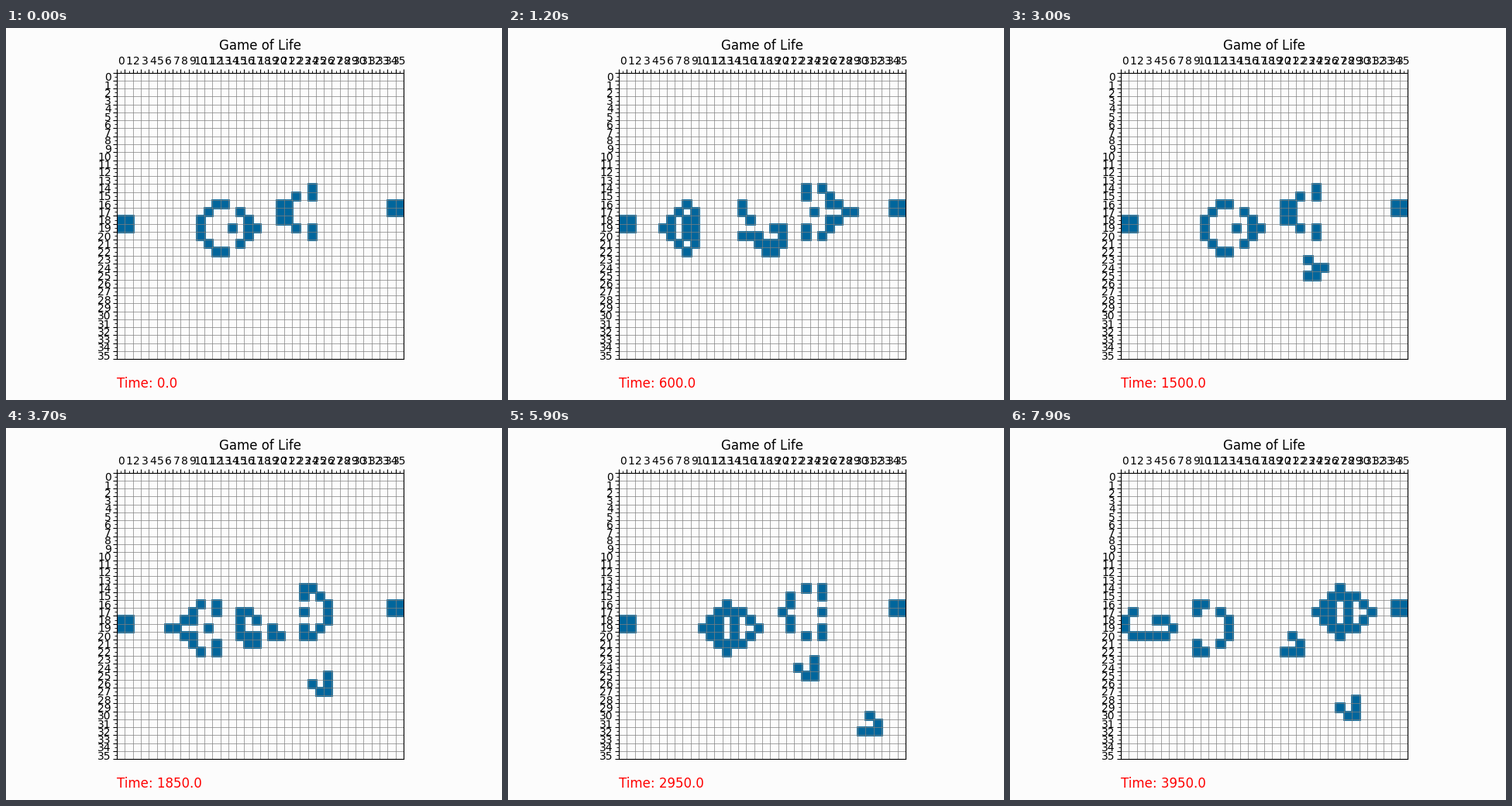
These frames come from a looping animation (640 by 480 pixels, 8 s). A matplotlib script:

```python
import numpy as np
import matplotlib.pyplot as plt
from matplotlib.animation import FuncAnimation
from matplotlib.patches import Rectangle

N = 36
MARGIN = 8  # hidden cells around the view, so gliders can leave
FRAMES = 80
STEP = 50.0
BG = "#fcfcfc"
CELL = "#00669c"


def glider_gun():
    """Two blocks with two shuttles between them, each mirrored on its own row."""
    board = np.zeros((N + 2 * MARGIN,) * 2, int)
    view = board[MARGIN:-MARGIN, MARGIN:-MARGIN]
    view[18:20, 0:2] = 1
    view[16:18, 34:36] = 1
    view[16:19, 20:22] = 1
    view[19, [14, 17]] = 1
    for side in (-1, 1):
        for d in range(4):
            view[19 + side * d, 10 + max(0, d - 1)] = 1
        for d, col in enumerate((16, 16, 15, 13)):
            view[19 + side * d, col] = 1
        view[17 + side * 2, [22, 24]] = 1
        view[17 + side * 3, 24] = 1
    return board


def evolve(board):
    p = np.pad(board, 1)
    n = len(board)
    count = sum(p[r:r + n, c:c + n]
                for r in range(3) for c in range(3)) - board
    return ((count == 3) | ((board == 1) & (count == 2))).astype(int)


boards = [glider_gun()]
while len(boards) < FRAMES:
    boards.append(evolve(boards[-1]))

fig, ax = plt.subplots(figsize=(6.4, 4.8), dpi=100, facecolor=BG)
ax.set_facecolor(BG)
ax.set_aspect("equal")
ax.set_xlim(-0.5, N - 0.5)
ax.set_ylim(N - 0.5, -0.5)
ax.xaxis.tick_top()

# Major ticks carry the grid, minor ticks the labels
for axis in (ax.xaxis, ax.yaxis):
    axis.set_ticks(np.arange(-0.5, N), labels=[""] * (N + 1))
    axis.set_ticks(np.arange(N), labels=range(N), minor=True)
ax.grid(which="major", color="gray", linewidth=0.5)
ax.set_title("Game of Life")
clock = ax.text(0, -0.1, "", color="red", fontsize=12, transform=ax.transAxes)
cells = []


def update(n):
    while cells:
        cells.pop().remove()
    for r, c in np.argwhere(boards[n][MARGIN:-MARGIN, MARGIN:-MARGIN]):
        cells.append(ax.add_patch(
            Rectangle((c - 0.5, r - 0.5), 1, 1, color=CELL, linewidth=2)))
    clock.set_text(f"Time: {n * STEP}")
    return cells + [clock]


anim = FuncAnimation(fig, update, frames=FRAMES, interval=100,
                     init_func=lambda: update(0), repeat=True, repeat_delay=0)
plt.show()
```
